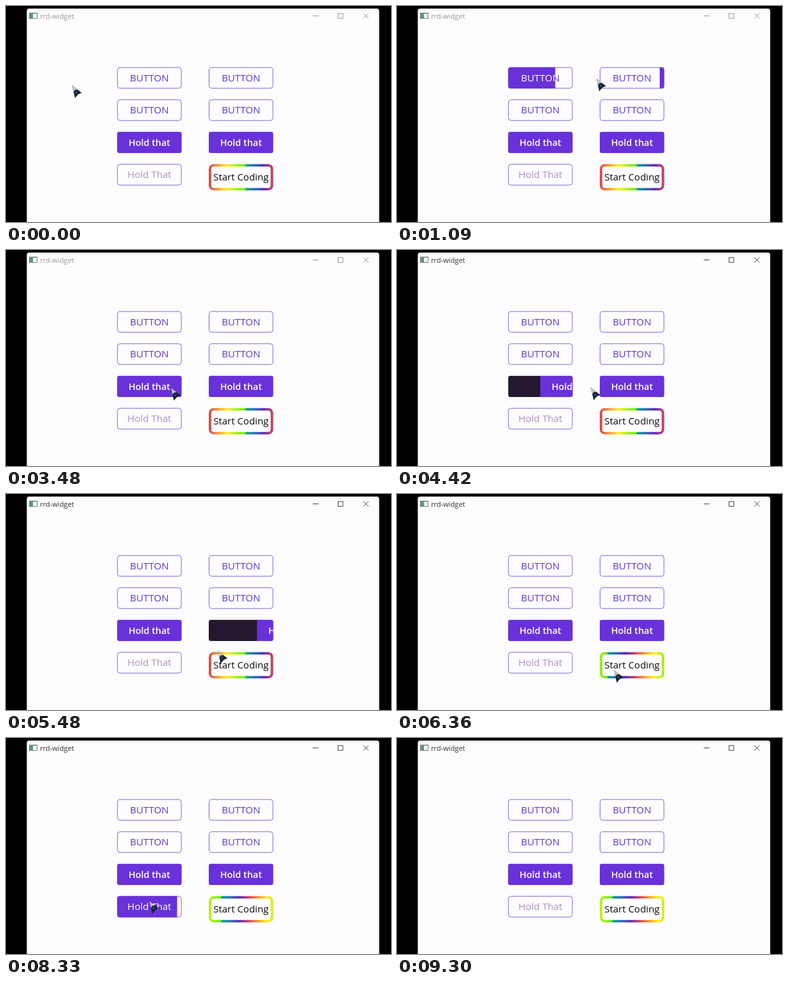
Recreate the animation shown at these times as an HTML page with a canvas. Size 600 px wide and 338 px high, loop 9.58 s.

```html
<!DOCTYPE html>
<html lang="en">
<head>
<meta charset="utf-8">
<title>rrd-widget</title>
<style>
  html, body { margin: 0; width: 100%; height: 100%; overflow: hidden; background: #000; }
  canvas { display: block; width: 600px; height: 338px; }
</style>
</head>
<body>
<canvas id="stage" width="600" height="338"></canvas>
<script>
const ctx = document.getElementById('stage').getContext('2d');
const LOOP = 9580;
const FONT = '"Open Sans", "Noto Sans", sans-serif';
const PURPLE = '#6931d9', LINE = '#7b6cd4', LABEL = '#6038c4', LILAC = '#b08fc2';
const DARK = '#23182f', PAPER = '#fdfcfe';
const W = 100.5, H = 33.5;
const HOVER = 300, SLIDE = 480, SPIN = .128;
const RAINBOW = ['#12a08c', '#2f6cb4', '#6428b0', '#cc4a58', '#f49a30', '#fff020', '#a4f01c', '#74e41e'];

const clamp = v => Math.max(0, Math.min(1, v));
const ease = u => u * u * (3 - 2 * u);
const mix = (a, b, u) => a + (b - a) * u;
const ramp = (t, start, length) => clamp((t - start) / length);
const pulse = (t, on, off, length) => ramp(t, on, length) - ramp(t, off, length);

// Covered part of a hovered button: x, y, w, h
const wipes = {
  left: p => [0, 0, W * p, H],
  right: p => [W * (1 - p), 0, W * p, H],
  middle: p => [W * (1 - p) / 2, 0, W * p, H],
  rows: p => [0, H * (1 - p) / 2, W, H * p]
};

// Buttons in visiting order; dx, dy is where the pointer rests on each.
const button = (draw, col, row, arrive, leave, dx, dy, look) =>
  ({ draw, x: 173.2 + col * 142.8, y: 95.7 + row * 50.5, arrive, leave, dx, dy, ...look });

const buttons = [
  button(outline, 0, 0, 420, 910, 49, 17, { wipe: 'left' }),
  button(outline, 1, 0, 1200, 1580, 36, 18, { wipe: 'right' }),
  button(outline, 1, 1, 1780, 2450, 31, 19, { wipe: 'rows' }),
  button(outline, 0, 1, 2760, 3040, 55, 17, { wipe: 'middle' }),
  button(hold, 0, 2, 3400, 4150, 84, 19),
  button(hold, 1, 2, 4580, 5330, 6, 18),
  button(rainbow, 1, 3, 5630, 7104, 22, 28),
  button(outline, 0, 3, 7560, 8210, 51, 5, { wipe: 'left', label: 'Hold That', color: LILAC })
];

const stops = [
  { x: 103, y: 124, leave: 30 },
  ...buttons.map(b => ({ x: b.x + b.dx, y: b.y + b.dy, arrive: b.arrive, leave: b.leave })),
  { x: 204, y: 342, arrive: 9300 }
];

function pointerAt(t) {
  const i = stops.findIndex(s => s.arrive > t);
  if (i < 0) return null;
  const a = stops[i - 1], b = stops[i];
  const e = ease(ramp(t, a.leave, b.arrive - a.leave));
  return [mix(a.x, b.x, e), mix(a.y, b.y, e)];
}

function roundBox(x, y, w, h, r) {
  ctx.beginPath();
  ctx.roundRect(x, y, w, h, r);
}

function text(str, x, y, color, size = 15, weight = 400, align = 'center') {
  ctx.font = `${weight} ${size}px ${FONT}`;
  ctx.textAlign = align;
  ctx.fillStyle = color;
  ctx.fillText(str, x, y);
}

function line(x0, y0, x1, y1) {
  ctx.beginPath();
  ctx.moveTo(x0, y0);
  ctx.lineTo(x1, y1);
  ctx.stroke();
}

function poly(points, fill) {
  ctx.beginPath();
  points.forEach(([x, y]) => ctx.lineTo(x, y));
  ctx.closePath();
  ctx.fillStyle = fill;
  ctx.fill();
}

function box(color, x, y, w, h) {
  ctx.fillStyle = color;
  ctx.fillRect(x, y, w, h);
}

function drawWindow(active) {
  box('#000', 0, 0, 600, 338);
  roundBox(32.4, 4, 549.2, 350, 4);
  ctx.fillStyle = PAPER;
  ctx.fill();

  box('#7c8284', 36, 10.5, 13, 9.5);
  box('#eef1f1', 37, 12, 11, 7);
  box('#5a9486', 37, 12, 5, 7);

  text('rrd-widget', 53, 19.5, active ? '#333' : '#999', 11, 400, 'left');
  ctx.strokeStyle = active ? '#444' : '#999';
  ctx.lineWidth = 1;
  line(478, 15.5, 487, 15.5);
  line(557, 11.5, 565, 19.5);
  line(565, 11.5, 557, 19.5);
  ctx.strokeRect(517.5, 11.8, 7.5, 7.5);
}

function outline({ x, y, arrive, leave, wipe, label = 'BUTTON', color = LABEL }, t) {
  roundBox(x + .5, y + .5, W - 1, H - 1, 4);
  ctx.strokeStyle = LINE;
  ctx.lineWidth = 1;
  ctx.stroke();
  text(label, x + W / 2, y + 22, color);

  const p = pulse(t, arrive - 130, leave + 100, HOVER);
  if (p <= 0) return;
  const [fx, fy, fw, fh] = wipes[wipe](p);
  ctx.save();
  ctx.beginPath();
  ctx.rect(x + fx, y + fy, fw, fh);
  ctx.clip();
  roundBox(x, y, W, H, 4);
  ctx.fillStyle = PURPLE;
  ctx.fill();
  text(label, x + W / 2, y + 22, '#fff');
  ctx.restore();
}

function hold({ x, y, arrive, leave }, t) {
  const p = pulse(t, arrive + 150, leave + 30, SLIDE), dx = W * p;
  ctx.save();
  roundBox(x, y, W, H, 4);
  ctx.clip();
  box(p > 0 ? DARK : PURPLE, x, y, W, H);
  box(PURPLE, x + dx, y, W, H);
  text('Hold that', x + W / 2 + dx, y + 22, '#fff', 14.4, 600);
  ctx.restore();
}

function rainbow({ x, y, arrive, leave }, t) {
  const h = 41.5, spin = Math.max(0, Math.min(t, leave + 100) - arrive - 300) * SPIN;
  const start = x + (57.5 + spin) % W - W;
  ctx.save();
  roundBox(x, y, W, h, 8);
  ctx.clip();
  for (const x0 of [start, start + W]) {
    const g = ctx.createLinearGradient(x0, 0, x0 + W, 0);
    RAINBOW.forEach((c, i) => g.addColorStop(i / (RAINBOW.length - 1), c));
    box(g, x0, y, W + .5, h);
  }
  ctx.restore();
  roundBox(x + 4, y + 4, W - 8, h - 8, 4);
  ctx.fillStyle = '#fff';
  ctx.fill();
  text('Start Coding', x + W / 2, y + 26, '#0a0a0a');
}

function drawPointer([x, y]) {
  ctx.save();
  ctx.translate(x, y);
  poly([[0, 0], [15, 12], [9.5, 14], [4.5, 20]], '#151f33');
  poly([[0, 0], [8.5, 6.8], [4.5, 7.5], [2.4, 10.5]], '#c4c5ca');
  poly([[5, 9], [9, 10.5], [5.5, 14]], '#28547f');
  ctx.restore();
}

function draw(t) {
  drawWindow(t >= 3550);
  buttons.forEach(b => b.draw(b, t));
  const tip = pointerAt(t);
  if (tip) drawPointer(tip);
}

function tick(now) {
  draw(now % LOOP);
  requestAnimationFrame(tick);
}
draw(0);
requestAnimationFrame(tick);
</script>
</body>
</html>
```
